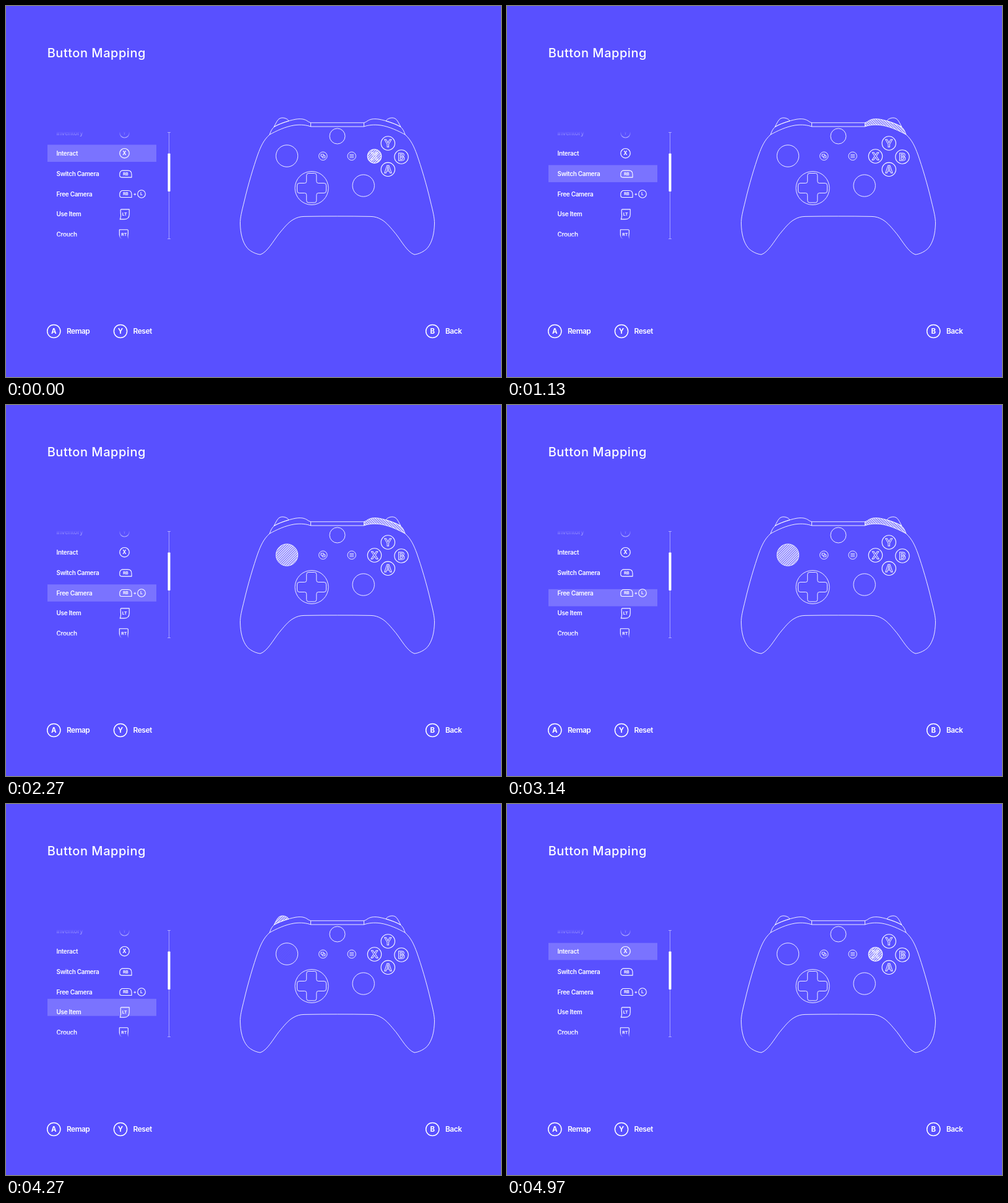
Recreate the animation shown at these times as an HTML page. Size 800 px wide and 600 px high, loop 5 s.

```html
<!DOCTYPE html>
<html lang="en">
<head>
<meta charset="utf-8">
<title>Button Mapping</title>
<style>
html, body { margin: 0; width: 100%; height: 100%; overflow: hidden; background: #5950ff; }
svg { display: block; width: 100%; height: 100%; }
text { font-family: Inter, Roboto, sans-serif; fill: #fff; stroke: none; }
.title { font-size: 20px; font-weight: 500; letter-spacing: .53px; }
.row { font-size: 10px; font-weight: 600; letter-spacing: -.32px; }
.action { font-size: 12px; font-weight: 600; letter-spacing: -.5px; }
.key { font-weight: 700; text-anchor: middle; }
.face { font-size: 16.5px; font-weight: 700; text-anchor: middle; fill: none; stroke: #fff; stroke-width: .9; }
.line { fill: none; stroke: #fff; stroke-width: 1.1; stroke-linejoin: round; }
.thin { stroke-width: .9; }
.hatch { fill: url(#stripes); }
</style>
</head>
<body>
<svg viewBox="0 0 800 600">
  <defs>
    <pattern id="stripes" width="2.7" height="2.7" patternUnits="userSpaceOnUse" patternTransform="rotate(45)">
      <rect width="2.7" height="2.7" fill="#fff" fill-opacity=".2"/>
      <rect width="1.2" height="2.7" fill="#fff"/>
    </pattern>
    <linearGradient id="fade" gradientUnits="userSpaceOnUse" x1="0" y1="203" x2="0" y2="377">
      <stop offset="0" stop-color="#000"/>
      <stop offset=".1" stop-color="#fff"/>
      <stop offset=".96" stop-color="#fff"/>
      <stop offset="1" stop-color="#000"/>
    </linearGradient>
    <mask id="window" maskUnits="userSpaceOnUse" x="60" y="203" width="190" height="174">
      <rect x="60" y="203" width="190" height="174" fill="url(#fade)"/>
    </mask>
    <path id="bumper" d="M426 208 C428 202 430 198 434 195 C443 190 456 185.500 468 183.200 C477 181.800 482 183 486 185.300 Q489 187.800 492.500 188.800 V195 C486 192.600 477 191.400 466 192.800 C451 195.200 437 202 426 208Z"/>
    <path id="trigger" d="M433 195.500 C435.500 191 437.500 186.500 440 183.700 C442.500 181 446 180.400 450 181.200 C454 182.200 456 184 457 186 C448 188.600 440 191.400 433 195.500Z"/>
    <path id="half" d="M426 208 C416 217 411.500 228 407 240 C400 260 391 290 385 316 C381 332 378.300 343 378.500 352 C379 368 382 382 390 391.500 C395 397 404 401.300 411 402 C422 398.500 432 380 441 368.500 C449 359 456 350 464 345.500 C470 342 475 340.500 482 340.400 C500 340 518 340 535.500 340"/>
    <g id="side">
      <use href="#half"/><use href="#bumper"/><use href="#trigger"/>
    </g>
  </defs>

  <rect width="800" height="600" fill="#5950ff"/>
  <text class="title" x="66.700" y="83">Button Mapping</text>

  <rect id="highlight" x="67" width="176" height="27.600" fill="#fff" fill-opacity=".2"/>
  <g id="rows" mask="url(#window)"></g>

  <path d="M263.500 204.500V376.500M261 204.500h5M261 376.500h5" class="line thin" stroke-opacity=".5"/>
  <rect x="261.500" y="238.500" width="4" height="61.500" rx=".8" fill="#fff"/>

  <g class="line thin">
    <use href="#side"/>
    <use href="#side" transform="translate(1071 0) scale(-1 1)"/>
    <path d="M492.500 188.800H578.500M492.500 195H578.500"/>
    <circle cx="535.500" cy="210.500" r="12.500"/>
    <circle cx="454" cy="242.500" r="17.700"/>
    <circle cx="577.700" cy="290.500" r="17.700"/>
    <circle cx="494" cy="294.500" r="27"/>
    <path d="M489 270.500h9.500q3.300 0 3.300 3.300v9.700q0 3 3 3h9.200q3.500 0 3.500 3.500v9q0 3.500 -3.500 3.500h-9.200q-3 0 -3 3v9q0 3.500 -3.300 3.500h-9.500q-3.300 0 -3.300 -3.500v-9q0 -3 -3 -3h-8.700q-3.500 0 -3.500 -3.500v-9q0 -3.500 3.500 -3.500h8.700q3 0 3 -3v-9.700q0 -3.300 3.300 -3.300Z"/>
    <circle cx="512.300" cy="242.700" r="6.700"/>
    <path d="M509 239.800h4.600v3.300h-4.600ZM513.800 242h2v3.600h-4.600v-2.300"/>
    <circle cx="558.700" cy="242.700" r="6.700"/>
    <path d="M555.200 240.300h7M555.200 242.700h7M555.200 245.100h7"/>
  </g>
  <g id="faces"></g>

  <g>
    <circle id="hatchX" class="hatch" cx="595.500" cy="243" r="11.200"/>
    <use id="hatchRB" class="hatch" href="#bumper" transform="translate(1071 0) scale(-1 1)"/>
    <circle id="hatchL" class="hatch" cx="454" cy="242.500" r="17.500"/>
    <use id="hatchLT" class="hatch" href="#trigger"/>
  </g>
  <g id="actions"></g>
</svg>
<script>
const el = id => document.getElementById(id);
const ROW_TOP = 224.4, ROW_STEP = 32.9, LOOP = 5000;

const key = (label, x, y, size) =>
  `<text class="key" x="${x}" y="${y + size * .364}" font-size="${size}">${label}</text>`;
const roundKey = (label, x, y, r, size, width) =>
  `<circle class="line" cx="${x}" cy="${y}" r="${r}" style="stroke-width:${width}"/>` + key(label, x, y, size);
const shapeKey = (label, x, y, path, size) =>
  `<path class="line" transform="translate(${x} ${y})" d="${path}"/>` + key(label, x, y, size);

const bumperKey = "M-6 -5.5H4Q9.6 -5.5 9.6 1V5.5H-6.5Q-9.6 5.5 -9.6 2.5V0Q-9.6 -3.5 -6 -5.5Z";
const leftTrigger = "M-5 -8H7.5V0Q7.500 8 -1 8H-7.5Q-5.500 4 -6.500 -2V-5.5Q-7 -8 -5 -8Z";
const rightTrigger = "M5 -8H-7.5V0Q-7.500 8 1 8H7.5Q5.500 4 6.500 -2V-5.5Q7 -8 5 -8Z";

const rows = [
  ["Inventory", y => roundKey("Y", 191.5, y, 7.7, 8, 1.2)],
  ["Interact", y => roundKey("X", 191.5, y, 7.7, 8.5, 1.2)],
  ["Switch Camera", y => shapeKey("RB", 193.4, y + .5, bumperKey, 6.8)],
  ["Free Camera", y => shapeKey("RB", 193.4, y, bumperKey, 6.8) + key("+", 208.3, y, 7.5) + roundKey("L", 219, y, 6.3, 6.8, 1.1)],
  ["Use Item", y => shapeKey("LT", 191.7, y, leftTrigger, 6.8)],
  ["Crouch", y => shapeKey("RT", 190.8, y, rightTrigger, 6.8)]
];
el("rows").innerHTML = rows.map(([label, icon], i) => {
  const y = 238.2 + (i - 1) * ROW_STEP;
  return `<text class="row" x="81.5" y="${y + 3.5}">${label}</text>` + icon(y);
}).join("");

el("faces").innerHTML = [["Y", 617.3, 222], ["X", 595.5, 243], ["B", 639, 244], ["A", 617.3, 264.3]]
  .map(([label, x, y]) => `<circle class="line" cx="${x}" cy="${y}" r="11.2"/>
    <text class="face" x="${x}" y="${y + 6}">${label}</text>`).join("");

el("actions").innerHTML = [["A", "Remap", 77.3], ["Y", "Reset", 185], ["B", "Back", 689.3]]
  .map(([label, name, x]) => roundKey(label, x, 526, 10.6, 11.5, 1.5) +
    `<text class="action" x="${x + 20.6}" y="530.3">${name}</text>`).join("");

// Start time, duration, row left, row entered
const moves = [
  [837, 290, 0, 1], [1970, 290, 1, 2], [3105, 290, 2, 3],
  [4237, 262, 3, 2], [4502, 262, 2, 1], [4767, 225, 1, 0]
];
// Strength of each highlighted control for every row
const active = { hatchX: [1, 0, 0, 0], hatchRB: [0, 1, 1, 0], hatchL: [0, 0, 1, 0], hatchLT: [0, 0, 0, 1] };

const easeOut = p => 1 - (1 - p) ** 2;
const easeInOut = p => p < .5 ? 2 * p * p : 1 - 2 * (1 - p) ** 2;
const mix = (a, b, p) => a + (b - a) * p;

function render(time) {
  let from = 0, to = 0, p = 1;
  for (const [start, duration, left, entered] of moves) {
    if (time < start) break;
    from = left;
    to = entered;
    p = Math.min(1, (time - start) / duration);
  }
  el("highlight").setAttribute("y", ROW_TOP + ROW_STEP * mix(from, to, easeOut(p)));
  for (const id in active) {
    el(id).setAttribute("opacity", mix(active[id][from], active[id][to], easeInOut(p)));
  }
}

const origin = performance.now();
function tick() {
  render((performance.now() - origin) % LOOP);
  requestAnimationFrame(tick);
}
tick();
</script>
</body>
</html>
```
